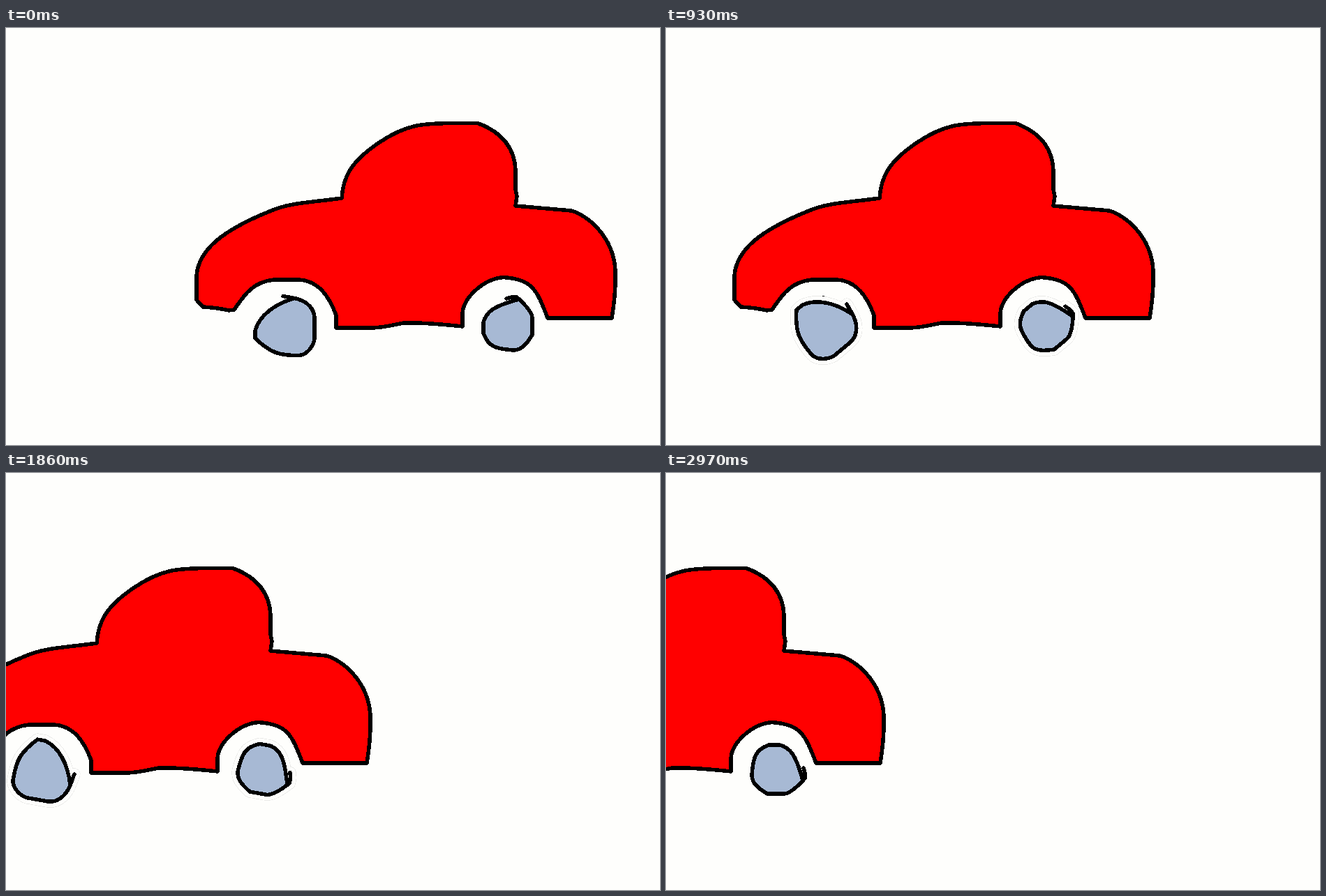
Recreate the animation shown at these times as an HTML page. Size 937 px wide and 598 px high, loop 3000 ms.

```html
<!DOCTYPE html>
<html lang="en">
<head>
<meta charset="utf-8">
<title>Red car</title>
<style>
  html, body { margin: 0; width: 100%; height: 100%; overflow: hidden; background: #fefefc; }
  svg { display: block; width: 937px; height: 598px; }
  path {
    stroke: #000; stroke-width: 5.5; stroke-linejoin: round; stroke-linecap: round;
    shape-rendering: crispEdges;
  }
  .rim { stroke: #e9e9e7; stroke-width: 17.5; }
  .gap { stroke: #fefefc; stroke-width: 16; }
  .tyre { fill: #a7b9d4; }
</style>
</head>
<body>
<svg viewBox="0 0 937 598">
  <g id="car">
    <!-- cabin, boot, rear arch, sill, front arch, bonnet -->
    <path fill="#f00" d="M481 244
      C483 212 495 191 535 164 S600 137 638 136.5 H676 C704 147 729 166 730 205 V232 L732 241 730 255
      L810 262 C832 268 870 298 873 347 V363 Q873 385 868 416 H776
      C760 374 754 361 713 357.5 C683 360 654 388 654 411 V428
      C626 425 598 422 570 423 C553 426 540 430 523 430 H473 V412
      C464 388 450 363 420 361 H384 C355 364 343 380 327 404 L319 405 Q302 401 282 400 L273 390
      V355 C276 318 310 290 380 262 C408 250 440 250 481 244Z"/>
    <path d="M396 384.5H401" style="stroke-width:1.5"/>
  </g>
</svg>
<script>
const car = document.getElementById('car');

const wheels = [
  { x: 403, y: 430, d: `M397 384.5 L411 387 C434 391 442 405 442 416 V446
    C440 458 430 469 420 469.5 C392 470 379 466 357 445 V434 C363 412 385 396 412 388` },
  { x: 720, y: 426, d: `M717 388 L724 386 732 386 C742 395 754 408 754 416 V440
    C746 453 739 462 727 462 C702 460 692 458 684 438 V422 C688 407 698 399 735 389` }
];

function add(parent, tag, attrs = {}) {
  const el = document.createElementNS(car.namespaceURI, tag);
  for (const key in attrs) el.setAttribute(key, attrs[key]);
  return parent.appendChild(el);
}

for (const w of wheels) {
  w.el = add(car, 'g');
  [w.rim] = ['rim', 'gap', 'tyre'].map(name => add(w.el, 'path', { class: name, d: w.d }));
}

function draw(now) {
  const step = Math.floor(now / 30) % 100;
  const angle = -10 * step;
  car.setAttribute('transform', `translate(${-Math.floor(step * 17 / 3)} 0)`);
  for (const w of wheels) {
    w.el.setAttribute('transform', `rotate(${angle} ${w.x} ${w.y})`);
    // The faint rim only shows while the wheel is off a quarter turn.
    w.rim.style.display = angle % 90 ? '' : 'none';
  }
  requestAnimationFrame(draw);
}
draw(0);
</script>
</body>
</html>
```
